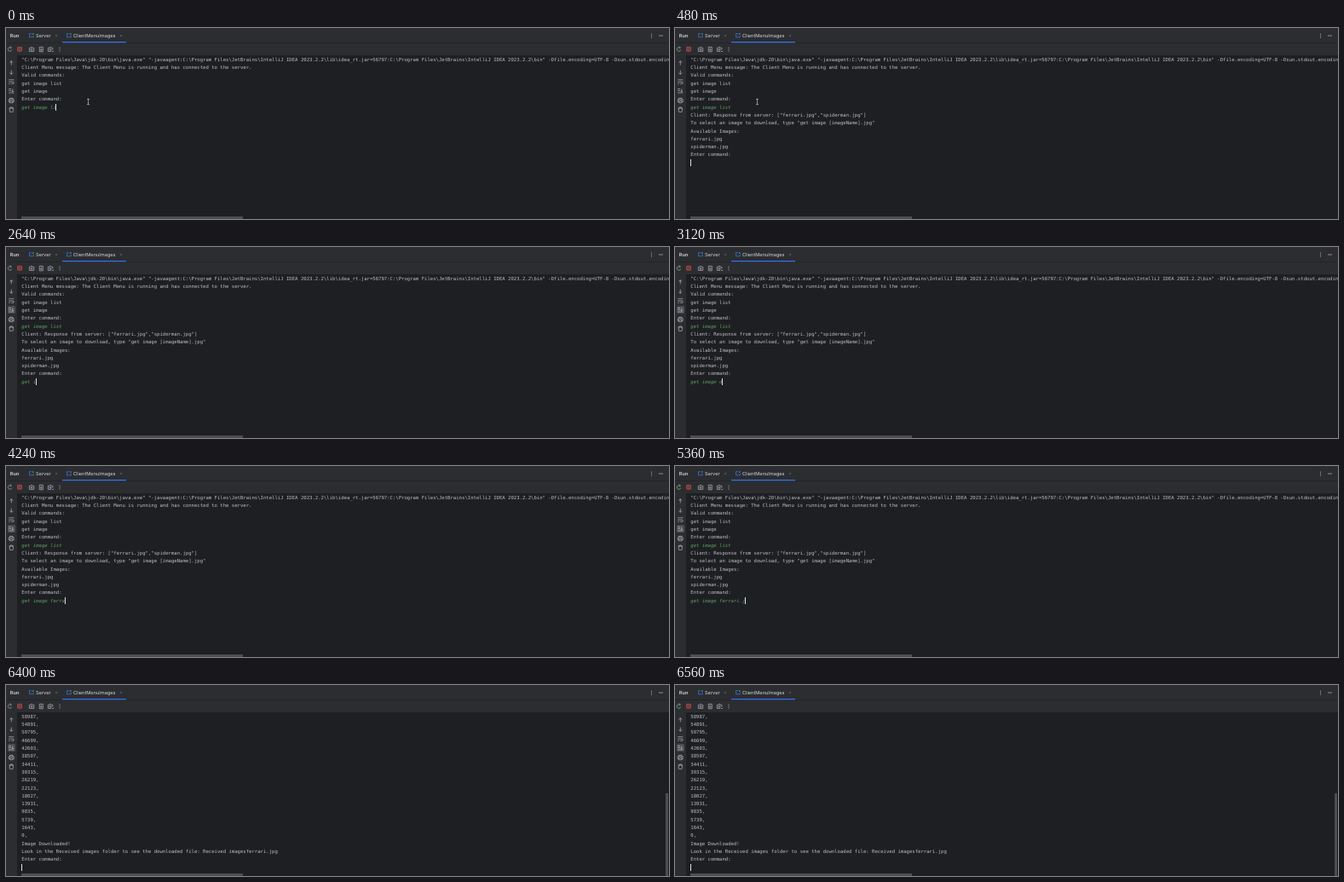
Write an HTML page that moves like this. It is 778 px wide and 224 px high and loops after 6640 ms.

```html
<!DOCTYPE html>
<html lang="en">
<head>
<meta charset="utf-8">
<title>Run console</title>
<style>
html, body { margin: 0; width: 100%; height: 100%; overflow: hidden; background: #1e1f22; }
svg { display: block; width: 778px; height: 224px; }
text { text-rendering: geometricPrecision; white-space: pre; }
.ui text { font: 5.64px Inter, sans-serif; fill: #d5d7db; }
#out text { font: 5.623px "DejaVu Sans Mono", monospace; fill: #bcbec4; }
#out .input { font-style: italic; fill: #5ba35f; }
.icon { fill: none; stroke: #c3c5cb; stroke-width: .65; }
</style>
</head>
<body>
<svg viewBox="0 0 778 224">
  <defs>
    <clipPath id="view"><path d="M13 32H778V224H13z"/></clipPath>
    <g id="app">
      <path d="M3 .8H.5V5H5.3V3" fill="#25324d" stroke="#4a78d6" stroke-width=".7"/>
      <circle cx="4.8" cy="1.1" r=".9" fill="#549159"/>
    </g>
    <path id="close" d="M-1.2-1.2 1.2 1.2M1.2-1.2-1.2 1.2" stroke="#7a7e85" stroke-width=".45"/>
    <g id="dots" fill="#ced0d6">
      <circle cy="-2" r=".5"/><circle r=".5"/><circle cy="2" r=".5"/>
    </g>
  </defs>
  <path d="M0 0H778V32H13V224H0z" fill="#2b2d30"/>
  <path d="M0 17.5H778" stroke="#1e1f22" stroke-width=".6"/>

  <g class="ui">
    <text x="4.8" y="10.9" style="font-weight:600">Run</text>
    <text x="35" y="10.9">Server</text>
    <text x="79" y="10.9">ClientMenuImages</text>
    <use href="#app" x="27" y="5.8"/>
    <use href="#app" x="71" y="5.8"/>
    <use href="#close" x="59" y="9"/>
    <use href="#close" x="135" y="9"/>
    <path d="M66 16.6H141" stroke="#3574f0" stroke-width="1.3"/>
    <use href="#dots" x="757.5" y="9"/>
    <path class="icon" d="M766 9H771"/>
    <use href="#dots" x="63" y="25"/>
  </g>

  <rect id="pressed" x="2" y="69" width="9" height="9" rx="1.5" fill="#4b4d52"/>
  <g class="icon">
    <path d="M6.8 25.6A2.3 2.3 0 1 1 5.5 22.9M4.7 21.7 6.5 23 4.7 24.2" stroke="#9db8a1"/>
    <rect x="13.5" y="22.3" width="5" height="5" rx=".6" fill="#7a3b3d" stroke="#bd5152"/>
    <path d="M27.4 23.4H28.6L29.2 22.5H31L31.6 23.4H32.8V27.4H27.4z"/><circle cx="30.1" cy="25.3" r="1"/>
    <path d="M39.3 22.3H43.3V27.8H39.3zM41.3 23.5V26.4M40.2 25.3 41.3 26.4 42.4 25.3"/>
    <path d="M49.4 23.4H50.6L51.2 22.5H53L53.6 23.4H54.8V25.6M53 27.4H49.4V23.4M53.8 26.8 55 28 56.2 26.8"/><circle cx="52.1" cy="25.3" r="1"/>
    <path d="M6.3 43.3V38.7M4.5 40.5 6.3 38.7 8.1 40.5"/>
    <path d="M6.3 49.7V54.3M4.5 52.5 6.3 54.3 8.1 52.5"/>
    <path d="M3.2 60.8H9.4M3.2 63.2H8.2A1.1 1.1 0 0 1 8.2 65.4H6.2M3.2 65.4H4.8"/>
    <path d="M3.2 71.5H6M3.2 73.5H6M3.2 76H9.4M7.8 71.3V75M6.6 73.8 7.8 75 9 73.8"/>
    <path d="M4.6 83.8V82.3H8V83.8M4.4 86.7H3.4V83.8H9.2V86.7H8.2M4.6 85.6H8V87.7H4.6z"/>
    <path d="M3.6 94H9M5.2 94V93H7.4V94M4.3 94V97.7Q4.3 98.5 5.1 98.5H7.5Q8.3 98.5 8.3 97.7V94"/>
  </g>

  <g clip-path="url(#view)"><g id="out"></g></g>
  <rect id="caret" width="1" height="8" fill="#dfe1e5"/>
  <path id="mouse" d="M95 83.4H98M96.5 83.4V89.6M95 89.6H98" fill="none" stroke="#c4c4c4" stroke-width=".7"/>
  <rect x="18" y="221" width="260" height="3" fill="#77797d" opacity=".52"/>
  <rect id="thumb" x="774" width="3" height="97" fill="#77797d" opacity=".52"/>
</svg>
<script>
const LOOP = 6640, LEFT = 18.3, CHAR = 3.385, PITCH = 9.31, TOP = 37, BASELINE = 1.75;
const $ = id => document.getElementById(id);

const ide = String.raw`C:\Program Files\JetBrains\IntelliJ IDEA 2023.2.2`;
const lines = [
  String.raw`"C:\Program Files\Java\jdk-20\bin\java.exe" "-javaagent:${ide}\lib\idea_rt.jar=56797:${ide}\bin" -Dfile.encoding=UTF-8 -Dsun.stdout.encoding=UTF-8`,
  'Client Menu message: The Client Menu is running and has connected to the server.',
  'Valid commands:', 'get image list', 'get image', 'Enter command:',
  'get image list',
  'Client: Response from server: ["ferrari.jpg","spiderman.jpg"]',
  'To select an image to download, type "get image [imageName].jpg"',
  'Available Images:', 'ferrari.jpg', 'spiderman.jpg', 'Enter command:',
  'get image ferrari.jpg',
  'Server: Sending...', 'Server: file size in bytes = 75371',
  'Client: Bytes remaining to be read from socket:'
];
for (let left = 75371; left > 0;) {
  left = Math.max(0, left - 4096);
  lines.push(left + ',');
}
lines.push('Image Downloaded!',
  'Look in the Received images folder to see the downloaded file: Received imagesferrari.jpg',
  'Enter command:');

// Caret position over time: [ms, row, column]
const steps = [
  [0, 6, 12], [80, 6, 13], [160, 6, 14], [320, 7, 0], [400, 13, 0],
  [2240, 13, 1], [2320, 13, 2], [2400, 13, 3], [2640, 13, 5],
  [2880, 13, 6], [2960, 13, 8], [3040, 13, 10], [3120, 13, 11],
  [3840, 13, 12], [3920, 13, 14], [4240, 13, 15], [4320, 13, 16], [4400, 13, 17],
  [5360, 13, 19], [5920, 13, 20], [6000, 13, 21], [6080, 39, 0]
];

const rows = lines.map((_, i) => {
  const el = document.createElementNS('http://www.w3.org/2000/svg', 'text');
  el.setAttribute('x', LEFT);
  if (i === 6 || i === 13) el.setAttribute('class', 'input');
  return $('out').appendChild(el);
});

const show = (id, on) => $(id).setAttribute('visibility', on ? 'visible' : 'hidden');

function draw(t) {
  const [, row, col] = steps.findLast(s => s[0] <= t);
  const scroll = t >= 6400 ? 20 : 0;
  const middle = i => TOP + (i - scroll) * PITCH;
  rows.forEach((el, i) => {
    let text = i < row ? lines[i] : i === row ? lines[i].slice(0, col) : '';
    // A mistyped letter, corrected shortly after
    if (i === 13 && t >= 3120 && t < 3680) text = 'get image d';
    if (el.textContent !== text) el.textContent = text;
    el.setAttribute('y', Math.round(middle(i) + BASELINE));
  });
  $('caret').setAttribute('x', Math.floor(LEFT + col * CHAR));
  $('caret').setAttribute('y', Math.round(middle(row) - 4));
  $('thumb').setAttribute('y', scroll ? 127 : 33);
  show('caret', t < 1120 || t >= 1920);
  show('mouse', t < 1120);
  show('pressed', t >= 1120);
  show('thumb', t >= 6080);
}

const start = performance.now();
function tick() {
  draw((performance.now() - start) % LOOP);
  requestAnimationFrame(tick);
}
tick();
</script>
</body>
</html>
```
